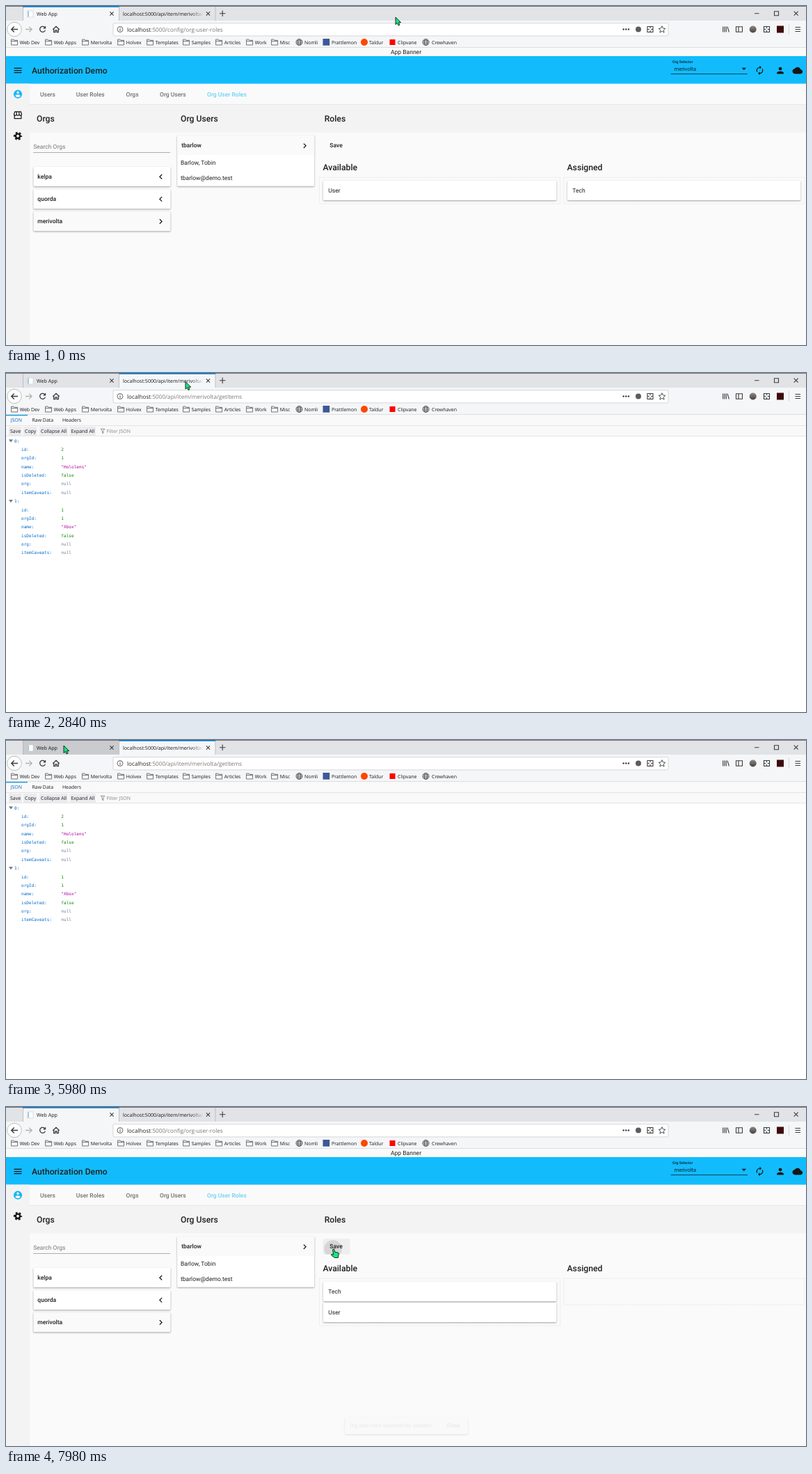
These frames come from a looping animation (1150 px wide and 487 px high, 8000 ms). An HTML page:

```html
<!DOCTYPE html>
<html lang="en">
<head>
<meta charset="utf-8">
<title>Authorization Demo</title>
<style>
  html, body { margin: 0; width: 100%; height: 100%; overflow: hidden; background: #fafafa; }
  svg { display: block; width: 1150px; height: 487px; }
  text { text-rendering: geometricPrecision; white-space: pre; }
  .ui { font-family: "Open Sans", "Noto Sans", sans-serif; }
  .app { font-family: Roboto, sans-serif; }
  .mono { font-family: "DejaVu Sans Mono", monospace; }
  .line { fill: none; stroke: #3c3c3f; stroke-width: 1.1; }
  .card { filter: drop-shadow(0 1px 1px rgba(0, 0, 0, .36)); }
</style>
</head>
<body>
<svg id="stage" viewBox="0 0 1150 487"></svg>
<script>
const LOOP = 8000;
const ORG = 'merivolta';

// Markup helpers; text is placed by its vertical centre
const rect = (x, y, w, h, fill, more = '') =>
  `<rect x="${x}" y="${y}" width="${w}" height="${h}" fill="${fill}" ${more}/>`;
const line = (d, more = '') => `<path class="line" d="${d}" ${more}/>`;
const text = (cls, size, x, y, str, fill, more = '') =>
  `<text class="${cls}" font-size="${size}" x="${x}" y="${y + size * .355}" fill="${fill}" ${more}>${str}</text>`;
const ui = (x, y, str, fill = '#18181a', size = 6.95, more) => text('ui', size, x, y, str, fill, more);
const app = (x, y, str, fill = '#1f1f1f', more) => text('app', 8.54, x, y, str, fill, more);
const bold = (x, y, str, fill = '#1f1f1f', size = 8.54) =>
  text('app', size, x, y, str, fill, 'font-weight="500"');
const head = (x, y, str) => bold(x, y, str, '#1f1f1f', 12.2);
const icon = (x, y, body, fill = '#161616', more = '') =>
  `<g transform="translate(${x - 7.3} ${y - 7.3}) scale(.61)" fill="${fill}" ${more}>${body}</g>`;
const glyph = (x, y, d, fill) => icon(x, y, `<path d="${d}"/>`, fill);
const group = (id, body, more = '') => `<g id="${id}" ${more}>${body}</g>`;
const cross = (x, y, r) => line(`M${x - r} ${y - r}l${2 * r} ${2 * r}m0 ${-2 * r}l${-2 * r} ${2 * r}`);

const LEFT = 'M15.41 7.41L14 6l-6 6 6 6 1.41-1.41L10.83 12z';
const RIGHT = 'M10 6L8.59 7.41 13.17 12l-4.58 4.59L10 18l6-6z';
const MENU = 'M3 18h18v-2H3zm0-5h18v-2H3zm0-7v2h18V6z';
const LOOP_ICON = 'M12 6v3l4-4-4-4v3c-4.42 0-8 3.58-8 8 0 1.57.46 3.03 1.24 4.26L6.7 14.8c-.45-.83-.7-1.79-.7-2.8 0-3.31 2.69-6 6-6zm6.76 1.74L17.3 9.2c.44.84.7 1.79.7 2.8 0 3.31-2.69 6-6 6v-3l-4 4 4 4v-3c4.42 0 8-3.58 8-8 0-1.57-.46-3.03-1.24-4.26z';
const PERSON = 'M12 12a4 4 0 1 0 0-8 4 4 0 0 0 0 8zm0 2c-2.67 0-8 1.34-8 4v2h16v-2c0-2.66-5.33-4-8-4z';
const CLOUD = 'M19.35 10.04C18.67 6.59 15.64 4 12 4 9.11 4 6.6 5.64 5.35 8.04 2.34 8.36 0 10.91 0 14c0 3.31 2.69 6 6 6h13c2.76 0 5-2.24 5-5 0-2.64-2.05-4.78-4.65-4.96z';
const ACCOUNT = 'M12 2a10 10 0 1 0 0 20 10 10 0 0 0 0-20zm0 3a3 3 0 1 1 0 6 3 3 0 0 1 0-6zm0 14.2c-2.5 0-4.71-1.28-6-3.22.03-1.99 4-3.08 6-3.08 1.99 0 5.97 1.09 6 3.08-1.29 1.94-3.5 3.22-6 3.22z';

function tabStrip() {
  return rect(0, 0, 1150, 21, '#e2e3e6') +
    rect(24, 1, 138, 20, '#cacbce', 'id="hover1"') + rect(163, 1, 138, 20, '#cacbce', 'id="hover2"') +
    group('active', rect(24, 0, 138.5, 21.5, '#f5f6f7') ) +
    line('M24.5 1V21M162.5 1V21M301 1V21', 'style="stroke:#b4b5b9;stroke-width:.8"') +
    rect(0, 0, 1150, .9, '#66676b') + rect(24, 0, 138.5, 1.7, '#0a76c4', 'id="accent"') +
    rect(31, 7, 8, 9, '#fff', 'stroke="#c4c8cc" stroke-width=".6"') + rect(31.5, 7.5, 1.4, 8, '#8ab6d8') +
    ui(44, 11.3, 'Web App', '#18181a', 7.15) +
    ui(168, 11.3, `localhost:5000/api/item/${ORG}/getItems`, 'url(#fade)', 7.15, 'id="title"') +
    '<circle id="dot" cy="11" r="1.3" fill="#333"/>' +
    cross(152, 11, 2.6) + cross(290.5, 11, 2.6) + line('M307 10.7h8.4M311.2 6.5v8.4') +
    line('M1076 10.7h6.5M1104.5 7.7h6v6h-6z') + cross(1135.7, 10.7, 3);
}

function boxIcon(x) {
  return line(`M${x - 4} 29.5h8v8h-8zM${x} 29.5v2.6m0 2.8v2.6M${x - 4} 33.5h2.8m2.4 0h2.8`);
}

function navBar() {
  return rect(0, 21, 1150, 39, '#f5f6f7') + rect(0, 59.4, 1150, .8, '#cfcfd2') +
    rect(44, 25, 17, 17, '#d3d4d6', 'rx="1.5" id="reloadHover"') +
    '<circle cx="12" cy="33.5" r="10.3" fill="#fdfdfd" stroke="#adaeb1" stroke-width=".8"/>' +
    line('M17 33.5H8m3.7-3.9L7.8 33.5l3.9 3.9', 'style="stroke-width:1.4"') +
    line('M28 33.5h9m-3.7-3.9l3.9 3.9-3.9 3.9', 'style="stroke:#b3b3b5;stroke-width:1.3"') +
    line('M56 31a4 4 0 1 0 .5 3.6', 'style="stroke-width:1.3"') + '<path d="M57.2 28.6v4h-4z" fill="#3c3c3f"/>' +
    line('M67.3 33.7l4.7-4.4 4.7 4.4M68.7 33v4.7h2.2v-2.8h2.2v2.8h2.2V33', 'style="stroke-width:1.3"') +
    rect(154, 24.7, 798, 18.2, '#fff', 'rx="1.2" stroke="#cdcdd0" stroke-width=".8"') +
    '<circle class="line" cx="164" cy="33.5" r="4" style="stroke-width:.8"/>' + rect(163.5, 33, 1, 2.8, '#3c3c3f') + rect(163.5, 31.1, 1, 1, '#3c3c3f') +
    ui(174, 33.9, '<tspan fill="#222">localhost</tspan><tspan id="path"></tspan>', '#77777a', 8.18) +
    line('M870.5 32.3l3 3 3-3', 'id="drop" style="stroke:#777"') +
    [887.7, 891.3, 895].map(x => `<circle cx="${x}" cy="33.5" r="1.2" fill="#3c3c3f"/>`).join('') +
    '<circle cx="909" cy="33.5" r="4" fill="#5c5c60"/>' + boxIcon(926) +
    line('M943 28.7l1.4 3.2 3.5.4-2.6 2.3.8 3.5-3.1-1.8-3.1 1.8.8-3.5-2.6-2.3 3.5-.4z', 'style="stroke-width:.9"') +
    line('M1030.7 29.5v8M1033 29.5v8M1035.3 29.5v8M1037 29.7l2.4 7.8M1049.5 29.7h9v7.5h-9zM1053 29.7v7.5') +
    '<circle cx="1073.7" cy="33.5" r="5" fill="url(#photo)"/>' + boxIcon(1093.5) +
    rect(1108, 28.5, 10, 10, '#3d0a0a', 'id="addon"') +
    line('M1125.5 26v15', 'style="stroke:#c8c8ca;stroke-width:.7"') + line('M1134.5 30.5h7.5m-7.5 3h7.5m-7.5 3h7.5');
}

function bookmarks() {
  const folders = { 7: 'Web Dev', 56: 'Web Apps', 109: 'Merivolta', 160: 'Holvex', 202: 'Templates', 254: 'Samples', 301: 'Articles', 345: 'Work', 381: 'Misc' };
  const sites = { 429: 'Nomli', 468: 'Prattlemon', 522: 'Taldur', 563: 'Clipvane', 612: 'Crewhaven' };
  const globe = x => `<g class="line" style="stroke-width:.8"><circle cx="${x}" cy="52" r="4.5"/><ellipse cx="${x}" cy="52" rx="2" ry="4.5"/><path d="M${x - 4.5} 52h9m-8.2-2.3h7.4m-7.4 4.6h7.4"/></g>`;
  return Object.entries(folders).map(([x, name]) =>
      line(`M${+x + .6} 56V48h3.4l1 1.3h4.6V56zM${+x + .6} 50.6h9`, 'style="stroke:#55555a;stroke-width:.8"') + ui(+x + 12.7, 52.3, name)).join('') +
    Object.entries(sites).map(([x, name]) => ui(x, 52.3, name)).join('') +
    globe(421.5) + globe(603.5) + rect(455.5, 47, 9.7, 9.7, '#3b5998') +
    '<circle cx="515" cy="52" r="5" fill="#ff4500"/>' + rect(551.5, 48, 8, 8, '#f00');
}

const plate = (x, y, w, h, body, fill = '#fff') =>
  `<g class="card">${rect(x, y, w, h, fill, 'rx="1.2"')}${body}</g>`;
const orgCard = (y, name, chev, fill) =>
  plate(39.5, y, 197, 28, bold(45.3, y + 14, name) + glyph(222.5, y + 14.2, chev), fill);
const listBox = (id, x) =>
  `<rect id="${id}" x="${x}" y="246.3" width="346" height="37.8" fill="none" stroke="#d9d9d9" stroke-width=".7" stroke-dasharray="1.2 1.2"/>`;
const role = (id, x, name) =>
  group(id, rect(x, 251, 335.3, 28, '#fff', 'rx="1.2"') + app(x + 7.3, 265, name));

function page() {
  const gear = '<g fill="none" stroke="#161616" stroke-width="4"><circle cx="12" cy="12" r="5.2"/><circle cx="12" cy="12" r="8" stroke-dasharray="4.2 4.178" stroke-dashoffset="2.1"/></g>';
  const shop = '<path fill="none" stroke="#161616" stroke-width="2" d="M5 4h14l2 5.5a2.8 2.8 0 0 1-6 .5 2.9 2.9 0 0 1-6 0 2.8 2.8 0 0 1-6-.5zM4 11.5V20h16v-8.5M9 4v6m6-6v6"/>';
  const tabs = { 49: 'Users', 100.7: 'User Roles', 172.5: 'Orgs', 221: 'Org Users' };
  return rect(0, 60, 1150, 427, '#fafafa') +
    app(575, 66.3, 'App Banner', '#1f1f1f', 'text-anchor="middle"') +
    rect(0, 72, 1150, 39.6, '#12bcfc') + glyph(17, 92.5, MENU) + head(37, 92.3, 'Authorization Demo') +
    bold(958, 80.3, 'Org Selector', '#123', 5.3) + text('app', 7.6, 960.5, 90.6, ORG, '#123') +
    rect(955.5, 97.3, 110.5, .8, '#123') + '<path d="M1057.5 88.8h6.6l-3.3 3.5z" fill="#123"/>' +
    glyph(1083.5, 92.5, LOOP_ICON) + glyph(1113, 92.5, PERSON) + glyph(1137.8, 92.5, CLOUD) +
    rect(34, 141, 1116, .8, '#dedede') + rect(34, 141.8, 1116, 39.7, '#f3f3f3') +
    rect(0, 111.6, 34, 376, '#f3f3f3') +
    Object.entries(tabs).map(([x, name]) => bold(x, 127, name, '#707070')).join('') +
    bold(289, 127, 'Org User Roles', '#6cd0f6') +
    glyph(17, 126.7, ACCOUNT, '#14b9f7') + group('shop', icon(17, 156.8, shop)) + group('gear', icon(17, 186.8, gear)) +
    head(44, 162, 'Orgs') + head(251, 162, 'Org Users') + head(457.7, 162, 'Roles') +
    app(39.2, 201.6, 'Search Orgs', '#777') + rect(39.2, 210, 197, .7, '#8f8f8f') +
    orgCard(231, 'kelpa', LEFT) + orgCard(263.2, 'quorda', LEFT) + orgCard(295.3, ORG, RIGHT, '#fafafa') +
    plate(246.2, 186.3, 197, 72.5, rect(246.2, 186.3, 197, 27.7, '#fafafa') + bold(252.2, 200.3, 'tbarlow') +
      glyph(429.5, 200.8, RIGHT) + app(251, 225, 'Barlow, Tobin') + app(251, 247, 'tbarlow@demo.test')) +
    rect(455.5, 189.3, 39.2, 22.5, '#eee', 'rx="2.4" id="saveHover"') +
    '<circle id="ripple" fill="#000" fill-opacity=".1" clip-path="url(#saveBox)"/>' + bold(465.3, 200.4, 'Save') +
    head(455.4, 231.3, 'Available') + head(806.5, 231.3, 'Assigned') +
    listBox('available', 450.6) + listBox('assigned', 801.8) +
    role('user', 456, 'User') + role('tech', 807, 'Tech') +
    group('snack', rect(487, 446, 177, 24, '#f6f6f6', 'rx="2" class="card" style="opacity:.5"') +
      text('app', 7.4, 494, 457.5, 'Org user roles successfully updated', '#dedede') + bold(633, 457.5, 'Close', '#dedede', 7.8));
}

function jsonView() {
  const rows = (id, name) => [['id', id, '#058b00'], ['orgId', 1, '#058b00'], ['name', `"${name}"`, '#a8009a'],
    ['isDeleted', 'false', '#058b00'], ['org', 'null', '#6f7d8c'], ['itemCaveats', 'null', '#6f7d8c']];
  const mono = (x, y, str, fill) => text('mono', 6.1, x, y, str, fill);
  const item = (n, id, name) => {
    const y = 97.4 + n * 86.6;
    return `<path d="M4 ${y - 1.8}h6l-3 3.8z" fill="#737377"/>` + mono(12, y, n + ':', '#0068c8') +
      rows(id, name).map(([key, value, fill], i) => {
        const row = y + 12.35 * (i + 1);
        return mono(22, row, key + ':', '#0068c8') + mono(79.3, row, value, fill);
      }).join('');
  };
  const button = (x, w, str) => rect(x, 77, w, 13, '#ebebee', 'rx="1"') + ui(x + 2, 83.7, str);
  return rect(0, 60, 1150, 427, '#fff') + rect(0, 60, 1150, 31, '#f9f9fa') +
    rect(0, 75, 1150, .7, '#dcdcdf') + rect(0, 90.4, 1150, .7, '#dcdcdf') + rect(0, 60, 31, 1.4, '#1a9be0') +
    ui(6.7, 68, 'JSON', '#0068c8') + ui(37.5, 68, 'Raw Data') + ui(81, 68, 'Headers') +
    button(4, 18.5, 'Save') + button(25, 19.5, 'Copy') + button(48, 41, 'Collapse All') + button(91.5, 37.5, 'Expand All') +
    line('M136.3 80.3h5.6l-2.1 3v3.6l-1.4-1v-2.6z', 'style="stroke:#77777a;stroke-width:.8"') + ui(144.5, 83.7, 'Filter JSON', '#858588') +
    item(0, 2, 'Hololens') + item(1, 1, 'Xbox') +
    group('status', rect(-1, 474.3, 163, 14, '#f7f7f8', 'stroke="#d2d2d5" stroke-width=".7"') + ui(2.5, 481.5, 'Waiting for localhost...', '#18181a', 7.15));
}

const $ = id => document.getElementById(id);
$('stage').innerHTML = `<defs>
  <linearGradient id="fade" gradientUnits="userSpaceOnUse" x1="266" x2="284"><stop stop-color="#18181a"/><stop offset="1" stop-color="#18181a" stop-opacity="0"/></linearGradient>
  <linearGradient id="photo" x2="0" y2="1"><stop stop-color="#8c8a88"/><stop offset="1" stop-color="#4a3f3a"/></linearGradient>
  <clipPath id="saveBox">${rect(455.5, 189.3, 39.2, 22.5, '#000', 'rx="2.4"')}</clipPath></defs>` +
  tabStrip() + navBar() + bookmarks() + group('page', page()) + group('json', jsonView()) +
  group('cursor', '<path id="arrow" d="M0 0V10.6L2.4 8.5 4 12 6 11.1 4.5 7.7H7.7Z"/>' +
    '<path id="hand" d="M.6 1.3Q1.6-.5 2.9 1.1L3.8 5 8 5.6Q9.5 6 9.3 8L8.4 13H3.4L-1.4 9.4Q-1.6 7.7.2 8L1.7 8.7Z"/>',
    'fill="#14e884" stroke="#0c1a12" stroke-width=".9" stroke-linejoin="round"');

// Pointer moves: start, end, control point, end point
const START = [560, 16];
const MOVES = [
  [1740, 2540, 353, 168, 258, 12.5],
  [3070, 3870, 170, 103, 88, 58],
  [3910, 4340, 70, 50, 51, 37.5],
  [5370, 5550, 65, 22, 83, 8],
  [6100, 6600, 500, 60, 847, 266],
  [6790, 7400, 670, 271, 496, 265],
  [7440, 7780, 480, 240, 469, 203.5]
];
const ramp = (t, a, b) => Math.min(1, Math.max(0, (t - a) / (b - a)));
const ease = u => u * u * (3 - 2 * u);

function pointer(t) {
  let [x, y] = START;
  for (const [a, b, cx, cy, ex, ey] of MOVES) {
    if (t < a) break;
    const u = ease(ramp(t, a, b)), v = 1 - u;
    x = v * v * x + 2 * u * v * cx + u * u * ex;
    y = v * v * y + 2 * u * v * cy + u * u * ey;
  }
  return [x, y];
}

const show = (id, on) => $(id).style.display = on ? '' : 'none';
const move = (id, x, y) => $(id).setAttribute('transform', `translate(${x} ${y})`);
const shadow = (id, lift) =>
  $(id).style.filter = `drop-shadow(0 ${1 + lift}px ${1 + 1.6 * lift}px rgba(0,0,0,${.36 + .06 * lift}))`;

function draw(t) {
  const [x, y] = pointer(t);
  const json = t >= 2590 && t < 6030;
  const loading = t >= 4560 && t < 5200;
  const onTab = left => y < 21 && x >= left && x < left + 138;

  show('json', json);
  show('page', !json);
  move('active', json ? 138.5 : 0, 0);
  move('accent', json ? 138.5 : 0, 0);
  show('hover1', onTab(24));
  show('hover2', onTab(163));
  $('path').textContent = json ? `:5000/api/item/${ORG}/getItems` : ':5000/config/org-user-roles';
  $('title').setAttribute('x', loading ? 182 : 168);
  show('dot', loading);
  $('dot').setAttribute('cx', 172 - 4 * Math.cos((t - 4560) / 105));
  show('status', loading);
  $('addon').style.opacity = loading ? .45 : 1;
  show('reloadHover', x > 44 && x < 61 && y > 25 && y < 42);
  $('drop').style.opacity = .5 * ramp(t, 1780, 1880) * (1 - ramp(t, 2420, 2530));

  // Dragging the role from one list to the other
  const drag = t >= 6790;
  const entered = drag && x < 770;
  const settle = ease(ramp(t, 7400, 7440));
  const dx = drag ? Math.max(x, 496) - 847 : 0;
  move('tech', t >= 7400 ? -351 : dx, drag && t < 7400 ? y - 266 : 0);
  shadow('tech', ramp(t, 6580, 6700) * (1 - settle));
  move('user', 0, entered ? 30 * ease(ramp(t, 6940, 7150)) : 0);
  shadow('user', 0);
  $('available').setAttribute('height', entered ? 67.8 : 37.8);

  const saved = t >= 7950;
  show('shop', !saved);
  move('gear', 0, saved ? -30 : 0);
  show('snack', saved);
  $('snack').style.opacity = ramp(t, 7950, 8000);
  const onSave = t > 7440 && y < 212;
  show('saveHover', onSave);
  const ripple = $('ripple');
  ripple.setAttribute('cx', 470);
  ripple.setAttribute('cy', 204);
  ripple.setAttribute('r', 15 * ramp(t, 7870, 8000));

  const hand = !json && (onSave || (y > 251 && y < 279 && x > 456));
  show('hand', hand);
  show('arrow', !hand);
  move('cursor', x, y);
}

function tick() {
  draw(performance.now() % LOOP);
  requestAnimationFrame(tick);
}
tick();
</script>
</body>
</html>
```
